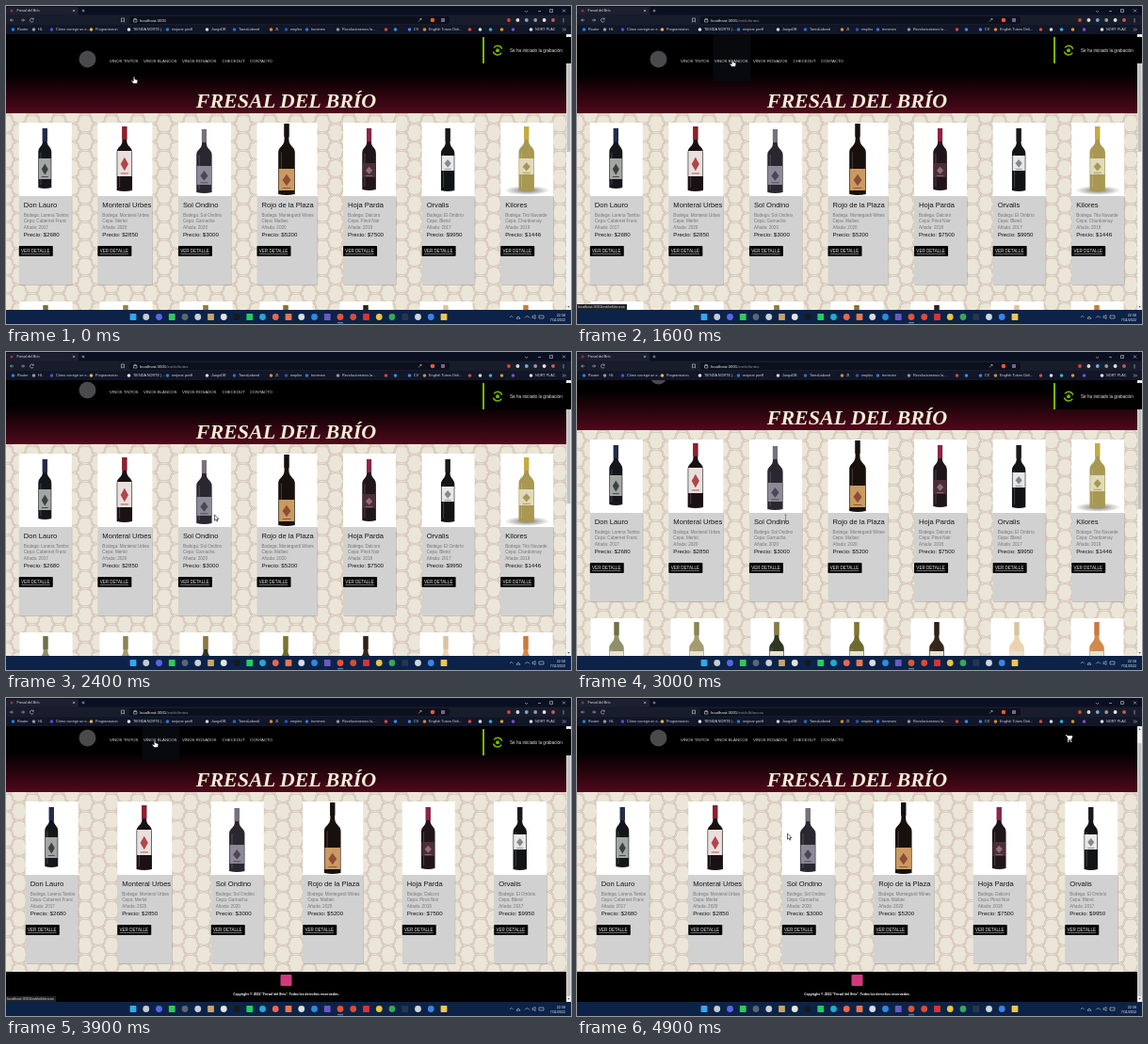
Recreate the animation shown at these times as an HTML page. Size 600 px wide and 338 px high, loop 5 s.

```html
<!DOCTYPE html>
<html lang="es">
<head>
<meta charset="utf-8">
<title>Fresal del Brío</title>
<style>
html, body { margin: 0; width: 100%; height: 100%; overflow: hidden; background: #000; }
svg { display: block; width: 100vw; height: 100vh; }
text { font-family: "Liberation Sans", Arial, sans-serif; white-space: pre; }
</style>
</head>
<body>
<svg id="stage" viewBox="0 0 600 338" preserveAspectRatio="none">
  <defs>
    <linearGradient id="wine" x1="0" y1="0" x2="0" y2="1">
      <stop offset=".5" stop-color="#000"/>
      <stop offset="1" stop-color="#4f091b"/>
    </linearGradient>
    <radialGradient id="shade">
      <stop offset="0" stop-color="#55524a" stop-opacity=".8"/>
      <stop offset="1" stop-color="#55524a" stop-opacity="0"/>
    </radialGradient>
    <path id="ogee" fill="none" d="M0 9.5Q7 9.5 7 4.75T14 0Q21 0 21 4.75T28 9.5Q21 9.5 21 14.25T14 19Q7 19 7 14.25T0 9.5"/>
    <pattern id="trellis" width="28" height="19" patternUnits="userSpaceOnUse">
      <rect width="28" height="19" fill="#ebe6d8"/>
      <use href="#ogee" stroke="#cdb6ab" stroke-width="2"/>
      <use href="#ogee" stroke="#ebe6d8" stroke-width=".8"/>
    </pattern>
  </defs>
</svg>
<script>
const SHOP = 'Fresal del Brío';
const LOOP = 5000, STEP = 100;
const PAGE_TOP = 30, PAGE_W = 595, HEADER_H = 84;
const stage = document.getElementById('stage');

function el(tag, attrs, parent = stage, content) {
  const node = document.createElementNS('http://www.w3.org/2000/svg', tag);
  for (const key in attrs) node.setAttribute(key, attrs[key]);
  if (content !== undefined) node.textContent = content;
  parent.appendChild(node);
  return node;
}
const set = (node, attrs) => { for (const key in attrs) node.setAttribute(key, attrs[key]); };
const show = (node, on) => node.setAttribute('visibility', on ? 'visible' : 'hidden');
const group = (parent, attrs = {}) => el('g', attrs, parent);
const rect = (p, x, y, width, height, fill, more) => el('rect', { x, y, width, height, fill, ...more }, p);
const circle = (p, cx, cy, r, fill, more) => el('circle', { cx, cy, r, fill, ...more }, p);
const path = (p, d, more) => el('path', { d, fill: 'none', ...more }, p);
const label = (p, x, y, size, fill, str, more) => el('text', { x, y, 'font-size': size, fill, ...more }, p, str);

// Bottle: top and bottom within the photo, half width, glass, capsule, label [y, height, colour, mark]
const wines = [
  { name: 'Don Lauro', cellar: 'Lorena Tambo', grape: 'Cabernet Franc', year: 2017, price: 2680, w: 56,
    bottle: [6, 70, 7, '#15161b', '#1f2b48', [38, 22, '#a3a6a3', '#3b4040']] },
  { name: 'Monteral Urbes', cellar: 'Monteral Urbes', grape: 'Merlot', year: 2020, price: 2850, w: 58,
    bottle: [4, 73, 8.2, '#1a1114', '#8f1f2c', [30, 27, '#e8e0de', '#b0454a']] },
  { name: 'Sol Ondino', cellar: 'Sol Ondino', grape: 'Garnacha', year: 2020, price: 3000, w: 56,
    bottle: [7, 75, 8.2, '#2b2730', '#77717b', [46, 20, '#8d8a98', '#4d4655']] },
  { name: 'Rojo de la Plaza', cellar: 'Montegardi Wines', grape: 'Malbec', year: 2020, price: 5200, w: 64,
    bottle: [1, 77, 8.8, '#18100c', '#14100f', [49, 23, '#c99b62', '#8d4d36']] },
  { name: 'Hoja Parda', cellar: 'Dalcoro', grape: 'Pinot Noir', year: 2018, price: 7500, w: 56,
    bottle: [6, 72, 7.3, '#20151a', '#8d2347', [43, 15, '#4b2e37', '#8d6f78']] },
  { name: 'Orvalis', cellar: 'El Ombrío', grape: 'Blend', year: 2017, price: 9950, w: 56,
    bottle: [6, 73, 7.2, '#111315', '#19191c', [35, 16, '#e8e8e8', '#85898c']] },
  { name: 'Kilores', cellar: 'Tito Navarde', grape: 'Chardonnay', year: 2019, price: 1446, w: 56, shaded: true,
    bottle: [4, 73, 8.2, '#a89851', '#c8aa3e', [38, 17, '#e0dabd', '#a89851']] },
];
const whites = [
  ['#8f9068', '#6f7143'], ['#a29c70', '#8d8350'], ['#2f3720', '#8d7a40'], ['#6d6a2c', '#7f7430'],
  ['#33261a', '#2e211a'], ['#ecd3b0', '#d9c3a0'], ['#d08a4c', '#c9793b'],
].map(([glass, cap], i) => ({
  ...wines[i], name: 'Blanco ' + 'Lira Onda Risco Vega Nube Sauce Duna'.split(' ')[i], w: 56, shaded: false,
  bottle: [4, 74, 7.8, glass, cap, [35, 23, '#e7e2cf', '#8d8462']],
}));

function drawBottle(g, cx, [top, bottom, half, glass, cap, [ly, lh, paper, mark]]) {
  const neck = 2.4, height = bottom - top;
  const neckEnd = top + height * .22, shoulder = top + height * .4;
  path(g, `M${cx - neck} ${top}H${cx + neck}V${neckEnd}C${cx + neck} ${shoulder - 6} ${cx + half} ${shoulder - 6} ${cx + half} ${shoulder}` +
    `V${bottom - 1}Q${cx} ${bottom + 1} ${cx - half} ${bottom - 1}V${shoulder}C${cx - half} ${shoulder - 6} ${cx - neck} ${shoulder - 6} ${cx - neck} ${neckEnd}Z`, { fill: glass });
  rect(g, cx - neck - .2, top, neck * 2 + .4, 14, cap, { rx: .6 });
  rect(g, cx - half * .7, shoulder, 1, bottom - shoulder - 4, '#fff', { opacity: .2 });
  rect(g, cx - half + .6, ly, half * 2 - 1.2, lh, paper);
  path(g, `M${cx} ${ly + lh * .25}l${half * .5} ${lh * .27}l${-half * .5} ${lh * .27}l${-half * .5} ${-lh * .27}z`, { fill: mark });
  rect(g, cx - half * .5, ly + lh * .87, half, .9, mark);
}

function drawCard(parent, x, y, wine) {
  const g = group(parent, { transform: `translate(${x} ${y})` });
  rect(g, .6, 79, wine.w, 93.8, '#8a8378', { opacity: .45 });
  rect(g, 0, 0, wine.w, 78, '#fff');
  rect(g, 0, 78, wine.w, 94, '#d1d1d1');
  if (wine.shaded) el('ellipse', { cx: 28, cy: 72, rx: 24, ry: 5, fill: 'url(#shade)' }, g);
  drawBottle(g, wine.w / 2 - .5, wine.bottle);
  label(g, 5, 90, 7.6, '#161616', wine.name);
  [`Bodega: ${wine.cellar}`, `Cepa: ${wine.grape}`, `Añada: ${wine.year}`]
    .forEach((line, i) => label(g, 5, 100 + i * 6.3, 4.6, '#77777a', line));
  label(g, 5, 121, 6.15, '#111', `Precio: $${wine.price}`);
  rect(g, 0, 131, 36, 11, '#050505', { rx: .8 });
  label(g, 2.3, 138.3, 4.55, '#eee', 'VER DETALLE', { 'text-decoration': 'underline' });
}

// Cards share the free width evenly, half a gap at each end.
function drawRow(parent, y, list) {
  const gap = (PAGE_W - list.reduce((sum, wine) => sum + wine.w, 0)) / list.length;
  let x = gap / 2;
  for (const wine of list) {
    drawCard(parent, x, y, wine);
    x += wine.w + gap;
  }
}

// Web page
const page = group(stage);
rect(page, 0, HEADER_H, PAGE_W, 700, 'url(#trellis)');
const fullList = group(page), redList = group(page);
drawRow(fullList, 94, wines);
drawRow(fullList, 284, whites);
drawRow(redList, 94, wines.slice(0, 6));
rect(redList, 0, 275, PAGE_W, 34, '#000');
rect(redList, 291.5, 278, 12, 12, '#d03a7c', { rx: 1 });
label(redList, 297.5, 300, 3.45, '#fff', `Copyright © 2022 "${SHOP}". Todos los derechos reservados.`,
  { 'text-anchor': 'middle', 'font-weight': 'bold', style: 'font-family:"Open Sans",sans-serif' });

rect(page, 0, 0, PAGE_W, HEADER_H, 'url(#wine)');
const hover = rect(page, 0, 0, 40, 50, '#07090d');
const ripple = circle(page, 0, 0, 0, '#fff');
circle(page, 86.5, 26.5, 9, '#4a4a4d');
[[110, 'VINOS TINTOS'], [146, 'VINOS BLANCOS'], [187, 'VINOS ROSADOS'], [229.5, 'CHECKOUT'], [259, 'CONTACTO']]
  .forEach(([x, str]) => label(page, x, 29.6, 4.35, '#dcdcdc', str));
label(page, 297.5, 78, 22, '#f5ecd9', SHOP.toUpperCase(),
  { 'text-anchor': 'middle', 'font-weight': 'bold', 'font-style': 'italic', style: 'font-family:"Liberation Serif",serif' });
const cart = group(page, { transform: 'translate(518.8 23.6)' });
path(cart, 'M0 0H1.4L3 4H6L7.2 1H2M3 4L2.2 5.3H6.6', { stroke: '#fff', 'stroke-width': .9 });
path(cart, 'M2 1H7L6 3.6H3Z', { fill: '#fff' });
[2.7, 6].forEach(x => circle(cart, x, 6.6, .7, '#fff'));

// Scroll bar
rect(stage, PAGE_W, PAGE_TOP, 5, 293, '#f1f1f1');
const thumb = rect(stage, PAGE_W + .6, 0, 3.8, 0, '#c1c1c1');
path(stage, 'M596.3 34L597.5 32.3L598.7 34ZM596.3 319L597.5 320.7L598.7 319Z', { fill: '#555' });

// Browser frame
const chrome = group(stage);
rect(chrome, 0, 0, 600, 10, '#0a1022');
rect(chrome, 0, 1, 77, 9, '#1c2030', { rx: 1.5 });
rect(chrome, 0, 9.5, 600, 10.5, '#191d2b');
rect(chrome, 0, 20, 600, 10, '#111628');
circle(chrome, 6, 5, 1.5, '#8d3148');
label(chrome, 11.5, 6.3, 3.7, '#e4e4e8', SHOP);
const line = { stroke: '#c9ccd4', 'stroke-width': .6 };
path(chrome, 'M71 3.8L73.2 6M73.2 3.8L71 6M80.5 5H83.5M82 3.5V6.5M8 15H4.5L6 13.5M4.5 15L6 16.5M16 15H19.5L18 13.5M19.5 15L18 16.5' +
  'M29 13.8A2 2 0 1 0 29.2 16M29.2 12.8V14.2H27.8M551 5L552.5 6.5L554 5M565 5.5H568M577.5 3.5H580.5V6.5H577.5ZM591 3.5L594 6.5M594 3.5L591 6.5', line);
rect(chrome, 131, 11, 340, 8, '#0c101c', { rx: 2 });
path(chrome, 'M122.5 13V17L124 15.8L125.5 17V13ZM135.5 14.5H139V17H135.5ZM136.2 14.5V13.4H138.2V14.5M438 16.5L441 13.5M441 15V13.5H439.5M592 13V17.5', line);
circle(chrome, 453, 15, 2.3, '#e65a32');
rect(chrome, 462, 13, 4, 4, '#76618c');
['#d64532', '#d9d9dd', '#68aee0', '#999ca3', '#e4e4e6', '#c95a55'].forEach((c, i) => circle(chrome, 534 + i * 9.4, 15, 1.9, c));
const url = label(chrome, 142, 16.6, 4.4, '#eeeef1', 'localhost:3001');
const urlPath = el('tspan', { fill: '#8d909a' }, url);
[
  [12, '#2783d9', 'Router'], [34, '#999', 'HL'], [53, '#5a4bd0', 'Cómo corregir un e…'], [95, '#e0b64d', 'Programacion'],
  [135, '#e9e9e9', 'TIENDA NORTE |…'], [176, '#3579c8', 'mejorar perfil'], [218, '#d7d7dd', 'JuegoDB'], [247, '#2f6cc0', 'TareaLaboral'],
  [286, '#de8a38', 'ZI.'], [302, '#2a55b4', 'emplex'], [324, '#3f70d4', 'trommen'], [357, '#8d939b', 'Revolucionemos la…'],
  [408, '#d34a42', ''], [418, '#3c8edf', ''], [433, '#4a82d8', 'CV'], [449, '#d9893a', 'English Tutors Onli…'],
  [497, '#db4c40', ''], [508, '#e4e4e4', ''], [519, '#2eb7d4', ''], [531, '#d39c31', ''], [543, '#8150c9', ''], [562, '#e6e6e6', 'NORT PLAC'],
].forEach(([x, c, str]) => {
  circle(chrome, x - 4.5, 25, 1.8, c);
  label(chrome, x, 26.3, 3.8, '#d9dbe2', str);
});
path(chrome, 'M591 23.5L592.5 25L591 26.5M593 23.5L594.5 25L593 26.5', line);

const status = group(stage);
rect(status, 0, 317, 53, 6, '#202329');
const statusText = label(status, 1, 321.4, 3.9, '#d8dade', '');

// Task bar
const bar = group(stage);
rect(bar, 0, 323, 600, 15, '#0c2347');
('#35a7ef #c5ccd4 #5965e8 #35c65a #5a6675 #c9d0d8 #c8a36a #e4e4e4 #18191d #1fce62 #26a8d7 #ec654f #e8764f ' +
 '#dadde4 #2c8be0 #6a59c4 #e65231 #de4a36 #df3035 #e9c442 #39a75a #26364d #cfd7de #3d82eb #f1c550')
  .split(' ').forEach((c, i) => {
    const x = 135 + i * 13.75;
    if (i % 3) circle(bar, x, 330.5, 3.4, c);
    else rect(bar, x - 3.4, 327.1, 6.8, 6.8, c, { rx: .6 });
  });
rect(bar, 352, 336.3, 6, .9, '#5ab2ef');
path(bar, 'M535 331L536.7 329.3L538.4 331M542 332.2Q544 328 546 332.2ZM551 331.5Q553.5 328 556 331.5M559 329.6H560.5L562 328.3V332.6L560.5 331.4H559ZM566 329H571V332H566Z', line);
label(bar, 594, 329.7, 3.7, '#eef0f4', '22:58', { 'text-anchor': 'end' });
label(bar, 594, 335.1, 3.7, '#eef0f4', '7/11/2022', { 'text-anchor': 'end' });

// Recording notice
const notice = group(stage);
rect(notice, 506, 33, 94, 28, '#000');
rect(notice, 506, 33, 2, 28, '#76b900');
path(notice, 'M518 44.5A4.8 4.8 0 0 1 526.7 45.8M526.2 49.6A4.8 4.8 0 0 1 517.4 48.5', { stroke: '#76b900', 'stroke-width': 1.4 });
circle(notice, 522, 47.2, 2, '#76b900');
label(notice, 535, 48.8, 4.65, '#e8e8e8', 'Se ha iniciado la grabación');
const wipe = rect(stage, 507, 33, 93, 28, '#76b900');

// Pointers, hot spot at 0,0
const outline = { fill: '#fff', stroke: '#000', 'stroke-width': .6, 'stroke-linejoin': 'round' };
const pointers = {
  hand: path(stage, 'M-.8 .4Q0 -.6 .8 .4V2.8L3.4 3.4Q4 3.7 3.9 4.6L3.2 7.6H-.8L-2.9 4.7Q-2.7 3.6 -1.7 4.2L-.8 5Z', outline),
  arrow: path(stage, 'M0 0V6.2L1.5 4.9L2.5 7.1L3.5 6.6L2.5 4.5H4.4Z', outline),
  beam: path(stage, 'M-1.2 0H1.2M0 0V7M-1.2 7H1.2', { stroke: '#444', 'stroke-width': .5 }),
};

const moveKeys = [[0, 136, 75], [300, 136, 75], [800, 127, 57], [1100, 127, 57], [1400, 165, 57], [1700, 165, 57],
  [1900, 146, 70], [2300, 221.5, 173], [3300, 221.5, 173], [3900, 158, 45], [4500, 158, 45], [4900, 223.5, 144]];
const scrollKeys = [[2300, 0], [2400, 16], [2500, 47], [2600, 78], [2700, 93], [2800, 78], [2900, 54], [3000, 31]];

function along(keys, t) {
  const next = keys.findIndex(key => key[0] > t);
  if (next === 0) return keys[0].slice(1);
  if (next < 0) return keys[keys.length - 1].slice(1);
  const a = keys[next - 1], b = keys[next];
  const k = (t - a[0]) / (b[0] - a[0]), eased = k * k * (3 - 2 * k);
  return a.slice(1).map((v, i) => v + (b[i + 1] - v) * eased);
}
const within = (t, from, to) => t >= from && t <= to;

function linkAt(t) {
  if (within(t, 500, 1100) || within(t, 2000, 2300)) return 'tintos';
  if (within(t, 1300, 1900) || within(t, 3900, 4500)) return 'blancos';
  return '';
}

function render(time) {
  const t = Math.floor(time % LOOP / STEP) * STEP;
  const filtered = t >= 3100;
  const scroll = filtered ? 14 : along(scrollKeys, t)[0];
  const [x, y] = along(moveKeys, t);

  set(page, { transform: `translate(0 ${PAGE_TOP - scroll})` });
  show(fullList, !filtered);
  show(redList, filtered);
  set(thumb, filtered ? { y: 48, height: 269 } : { y: 36 + scroll * .39, height: 119 });

  const link = linkAt(t);
  show(hover, link && !within(t, 2000, 2300));
  set(hover, { x: link === 'tintos' ? 107 : 144.5 });
  show(status, link);
  set(status, { opacity: t === 2300 ? .6 : 1 });
  statusText.textContent = `localhost:3001/estilo/${link}`;
  urlPath.textContent = t < 1100 ? '' : `/estilo/${t < 4200 ? 'tintos' : 'blancos'}`;

  const age = t - (t < 3000 ? 900 : 4100);
  const rippling = within(age, 100, 300);
  show(ripple, rippling);
  if (rippling) set(ripple, { cx: x, cy: y - PAGE_TOP + scroll, r: Math.min(18, age * .075), opacity: age > 200 ? .1 : .2 });

  const slide = Math.min(1, Math.max(0, (t - 4100) / 400));
  show(notice, t < 4100);
  show(wipe, t >= 4100 && slide < 1);
  set(wipe, { x: 507 + 94 * slide });

  const kind = t < 2000 || within(t, 3900, 4500) ? 'hand' : t === 3000 ? 'beam' : 'arrow';
  for (const name in pointers) {
    show(pointers[name], name === kind);
    set(pointers[name], { transform: `translate(${x} ${y})` });
  }
}

const start = performance.now();
function tick() {
  render(performance.now() - start);
  requestAnimationFrame(tick);
}
tick();
</script>
</body>
</html>
```
